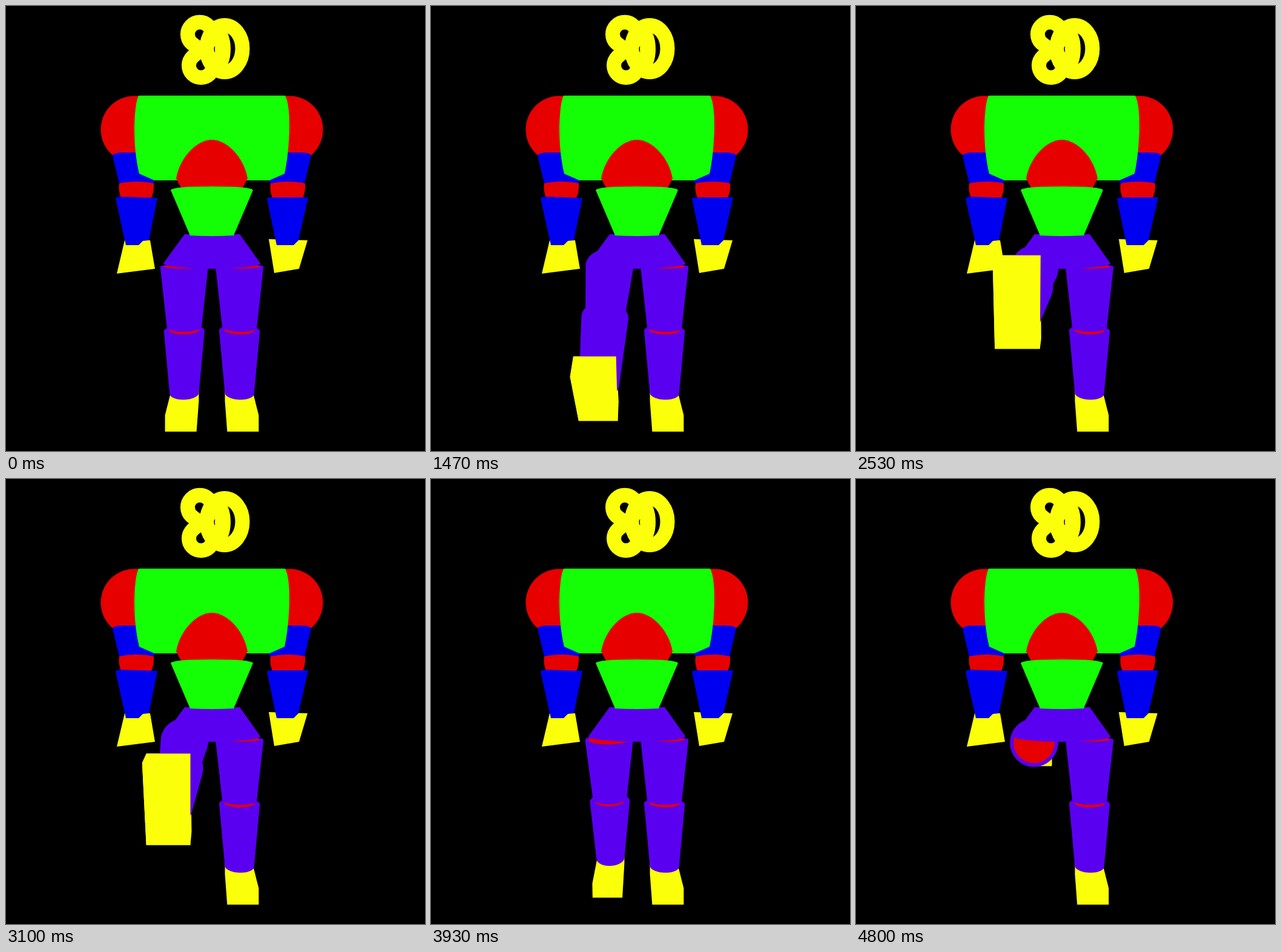
Recreate the animation shown at these times as an HTML page with a canvas. Size 692 px wide and 735 px high, loop 6310 ms.

```html
<!DOCTYPE html>
<html lang="en">
<head>
<meta charset="utf-8">
<title>Leg swing</title>
<style>
  html, body { margin: 0; width: 100%; height: 100%; overflow: hidden; background: #000; }
  canvas { display: block; }
</style>
</head>
<body>
<canvas id="stage" width="692" height="735"></canvas>
<script>
const ctx = document.getElementById('stage').getContext('2d');
const RED = '#e60000', GREEN = '#14ff06', BLUE = '#0000f0', PURPLE = '#5a00f0', YELLOW = '#fbff0a';
const LOOP = 6310;
const VIEW = 600;              // camera distance from the hip plane
const CX = 340, CY = 367;      // vanishing point
const HIP_X = -45.5, HIP_Y = 68;

// Runs of even steps: first time, last time, number of steps, first angle, last angle
const RUNS = [
  [0, 0, 1, 0, 0],
  [430, 430, 1, 2.5, 2.5],
  [930, 1470, 8, 5.5, 53.5],
  [1570, 1800, 4, 61, 86],
  [2530, 2530, 1, 83, 83],
  [3030, 3470, 7, 76, 35.5],
  [3570, 3630, 2, 29, 22],
  [3700, 3930, 4, 15, -7.5],
  [4000, 4330, 8, -12.5, -47],
  [4400, 4570, 4, -51, -63],
  [4730, 4800, 2, -75, -87]
];

function angleAt(t) {
  const [start, end, count, from, to] = RUNS.filter(r => r[0] <= t).pop();
  if (count === 1) return from;
  const gap = (end - start) / (count - 1);
  const step = Math.min(count - 1, Math.floor((t - start) / gap + 1e-6));
  return from + (to - from) * step / (count - 1);
}

function shape(d, color) {
  ctx.fillStyle = color;
  ctx.fill(new Path2D(d));
}

function mirrored(draw) {
  ctx.save();
  ctx.translate(2 * CX, 0);
  ctx.scale(-1, 1);
  draw();
  ctx.restore();
}

function hull(points) {
  const sorted = [...points].sort((p, q) => p[0] - q[0] || p[1] - q[1]);
  const half = list => {
    const out = [];
    for (const p of list) {
      while (out.length > 1) {
        const [a, b] = out.slice(-2);
        if ((b[0] - a[0]) * (p[1] - a[1]) - (b[1] - a[1]) * (p[0] - a[0]) > 0) break;
        out.pop();
      }
      out.push(p);
    }
    return out.slice(0, -1);
  };
  return [...half(sorted), ...half(sorted.reverse())];
}

function solid(points, color) {
  shape('M' + hull(points).map(p => p.join(' ')).join('L') + 'Z', color);
}

// One leg swung about the hip; forward angles come towards the viewer.
function makeLeg(degrees) {
  const rad = degrees * Math.PI / 180, s = Math.sin(rad), c = Math.cos(rad);
  // x across, along = distance down the leg, front = distance ahead of its axis
  const project = (x, along, front) => {
    const k = VIEW / (VIEW - along * s - front * c);
    return [CX + x * k, CY + (HIP_Y + along * c - front * s) * k];
  };
  const ring = (along, r) => Array.from({ length: 64 }, (_, i) => {
    const a = i * Math.PI / 32;
    return project(HIP_X + r * Math.cos(a), along, r * Math.sin(a));
  });
  const edge = (along, front) => [project(-69, along, front), project(-22.6, along, front)];
  const faces = along => c * (HIP_Y + along * c) > s * (VIEW - along * s);

  const toe = [...edge(231.6, 65), ...edge(207.5, 65)];
  const heel = edge(231.6, -28);
  const thigh = () => solid([...ring(-5, 39.5), ...ring(95, 28.5)], PURPLE);
  const knee = () => solid(ring(100, 25), RED);
  const shin = () => solid([...ring(101, 33.5), ...ring(204, 24)], PURPLE);
  const raised = degrees > 15;

  return {
    back() {
      solid([...toe, ...heel, ...edge(208, 0), ...edge(208, -28)], YELLOW);
      const parts = [shin, knee, thigh];
      if (raised) parts.reverse();
      parts.forEach(draw => draw());
      if (faces(-5)) solid(ring(-5, 33.5), RED);
    },
    front() {
      if (raised) solid([...toe, ...heel], YELLOW);
    }
  };
}

function head() {
  ctx.strokeStyle = YELLOW;
  ctx.lineWidth = 24;
  ctx.stroke(new Path2D('M306 61A20 20 0 1 1 334 61L308 84A20 20 0 1 0 336 84Z'));
  ctx.beginPath();
  ctx.ellipse(361, 70.5, 29.5, 38.5, 0, 0, 7);
  ctx.stroke();
  ctx.beginPath();
  ctx.ellipse(358, 71, 13, 33, 0, 0, 7);
  ctx.fillStyle = YELLOW;
  ctx.fill();
}

function upperArm() {
  shape('M222 148.5H212a55.5 55.5 0 0 0 0 111H222Z', RED);
  shape('M176 247Q178 242 195 242H222V277L246 288L244 293H187Z', BLUE);
}

function elbow(x) {
  ctx.save();
  ctx.translate(x, 0);
  shape('M187 293Q200 290 216 290Q232 290 244 293Q245 306 240 317H190Q185 304 187 293Z', RED);
  ctx.restore();
}

function body() {
  head();
  upperArm();
  mirrored(upperArm);
  elbow(0);
  elbow(250);
  shape('M196 387H238L246 434L183 442Z', YELLOW);
  shape('M434 385L498 387L484 434L443 441Z', YELLOW);
  shape('M181 318Q183 315 190 315L250 317L236 387L226 388L219 395H198Z', BLUE);
  shape('M431 318Q433 316 440 316L499 316L483 387L475 395H447Z', BLUE);
  shape('M219 148H461Q468 160 468 200Q467 245 460 277L435 288H245L220 277Q212 245 212 200Q213 160 219 148Z', GREEN);
  shape('M281 285C287 250 315 221 340 221C365 221 393 250 399 285L391 300H289Z', RED);
}

function hips() {
  shape('M295 377H386L420 425A80 9 0 0 1 260 425Z', PURPLE);
  shape('M272 304Q276 298 340 298Q404 298 408 304L376 379Q340 381 304 379Z', GREEN);
}

const standing = makeLeg(0);

function frame(now) {
  const leg = makeLeg(angleAt(now % LOOP));
  ctx.fillStyle = '#000';
  ctx.fillRect(0, 0, 692, 735);
  body();
  mirrored(standing.back);
  leg.back();
  hips();
  leg.front();
}

const begin = performance.now();
function tick() {
  frame(performance.now() - begin);
  requestAnimationFrame(tick);
}
tick();
</script>
</body>
</html>
```
